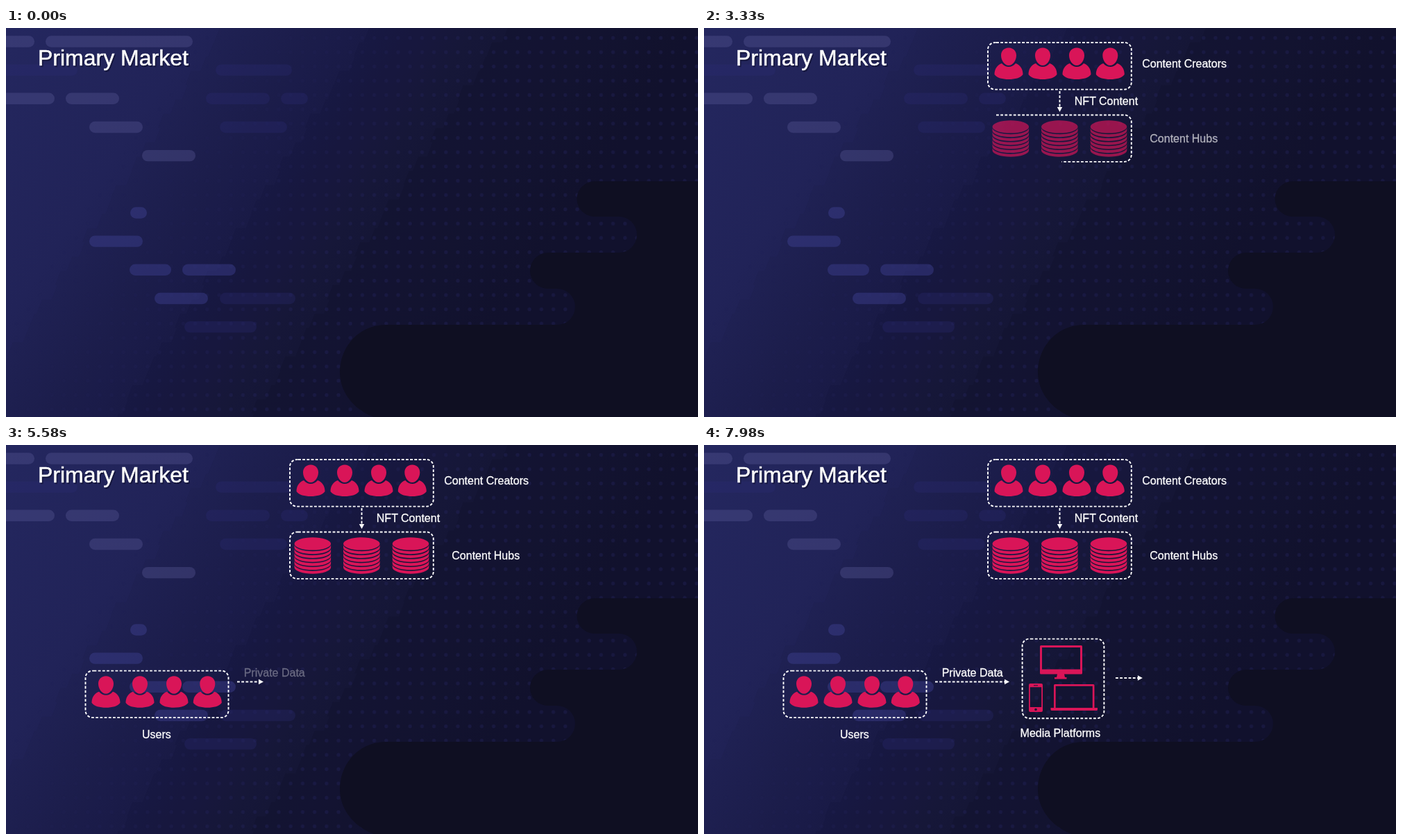
An HTML page for the animation above (8000 ms loop, 997 by 561 pixels).

```html
<!DOCTYPE html>
<html lang="en">
<head>
<meta charset="utf-8">
<title>Primary Market</title>
<style>
  html, body { margin: 0; width: 100%; height: 100%; overflow: hidden; background: #131330; }
  svg { display: block; width: 100%; height: 100%; }
  text { font: 16px "Liberation Sans", Arial, sans-serif; fill: #fff; stroke: #fff; stroke-width: .3; }
  .title { font-size: 32px; stroke-width: .5; }
  .shade { fill: #0b0b25; stroke: #0b0b25; opacity: .55; }
  .dash { fill: none; stroke: #fff; stroke-width: 1.9; stroke-dasharray: 3.8 2.4; }
  .icon { fill: #d91558; fill-rule: evenodd; }
</style>
</head>
<body>
<svg id="stage" viewBox="0 0 997 561" preserveAspectRatio="none">
  <defs>
    <linearGradient id="sky" gradientUnits="userSpaceOnUse" x1="0" y1="0" x2="698" y2="458">
      <stop offset="0" stop-color="#24275f"/>
      <stop offset=".28" stop-color="#212358"/>
      <stop offset=".5" stop-color="#1b1c4a"/>
      <stop offset=".72" stop-color="#161739"/>
      <stop offset="1" stop-color="#131330"/>
    </linearGradient>
    <linearGradient id="fade" gradientUnits="userSpaceOnUse" x1="200" y1="131" x2="480" y2="315">
      <stop offset="0" stop-color="#000"/>
      <stop offset="1" stop-color="#fff"/>
    </linearGradient>
    <pattern id="dots" width="17.2" height="20.6" patternUnits="userSpaceOnUse" x="6" y="4">
      <circle cx="8.6" cy="10.3" r="2.6" fill="#25265f" opacity=".38"/>
    </pattern>
    <mask id="dotMask" maskUnits="userSpaceOnUse" x="0" y="0" width="997" height="561">
      <rect width="997" height="561" fill="url(#fade)"/>
    </mask>
  </defs>
  <rect width="997" height="561" fill="url(#sky)"/>
  <g id="back"></g>
  <rect width="997" height="561" fill="url(#dots)" mask="url(#dotMask)"/>
  <path fill="#0f0f22" d="M997 221H848a25.5 25.5 0 0 0 0 51H883a26 26 0 0 1 0 52H781a26 26 0 0 0 0 52H794a26 26 0 0 1 0 52H548C508 428 481 460 481 497C481 524 500 550 530 561H997Z"/>
  <g id="pills"></g>
  <text class="title shade" x="47.5" y="56">Primary Market</text>
  <text class="title" x="46" y="54.4">Primary Market</text>
  <g id="front"></g>
</svg>
<script>
const LOOP = 8000;
const $ = id => document.getElementById(id);

function add(parent, tag, attrs = {}, text) {
  const el = document.createElementNS("http://www.w3.org/2000/svg", tag);
  for (const k in attrs) el.setAttribute(k, attrs[k]);
  if (text) el.textContent = text;
  return parent.appendChild(el);
}

// Darker diagonal bands with a slightly ragged left edge
function band(x0, opacity) {
  let d = "M997 0";
  for (let y = 0, i = 0; y < 570; y += 20.6, i++) {
    const x = x0 - y * 0.656 + 5 * Math.sin(i * 2.3 + x0);
    d += `L${x.toFixed(1)} ${y.toFixed(1)}l-8 20.6`;
  }
  add($("back"), "path", { d: d + "H997Z", fill: "#101029", opacity });
}
band(312, .06);
band(525, .1);
band(718, .27);

// Pills: row, left, right, kind (0 light, 1 blue, 2 faint)
const kinds = [["#5a5a96", .36], ["#43459a", .4], ["#2b2b78", .28]];
[
  [0, -30, 41, 0], [0, 57, 269, 0], [1, -30, 103, 2], [1, 302, 412, 2],
  [2, -30, 70, 0], [2, 86, 163, 0], [2, 288, 380, 2], [2, 396, 435, 2],
  [3, 120, 197, 0], [3, 308, 405, 2], [4, 196, 273, 0], [6, 179, 203, 1],
  [7, 120, 197, 1], [8, 178, 238, 1], [8, 254, 331, 1], [9, 214, 291, 1],
  [9, 308, 417, 2], [10, 257, 361, 2]
].forEach(([row, a, b, kind]) => add($("pills"), "rect", {
  x: a, y: 11.3 + row * 41.16, width: b - a, height: 16.4, rx: 8.2,
  fill: kinds[kind][0], opacity: kinds[kind][1]
}));

const icon = (g, d, x = 0, y = 0) =>
  add(g, "path", { d, class: "icon", transform: `translate(${x} ${y})` });

const PERSON = "M0-13C7-13 11-8 11-2C11 5 6 12.5 0 12.5S-11 5-11-2C-11-8-7-13 0-13Z" +
  "M-10 9.5C-17 12-20.5 18-20.5 25.5C-17 30.5-9 32.5 0 32.5S17 30.5 20.5 25.5" +
  "C20.5 18 17 12 10 9.5C7 13 4 14.5 0 14.5S-7 13-10 9.5Z";

let HUB = "M-26.3 0a26.3 9.2 0 0 1 52.6 0a26.3 9.2 0 0 1-52.6 0Z";
for (let i = 0; i < 6; i++)
  HUB += `M-26.3 ${1.6 + i * 5.7}a26.3 9.2 0 0 0 52.6 0v4.1a26.3 9.2 0 0 1-52.6 0Z`;

const MONITOR = "M485.5 289H543.5q1.5 0 1.5 1.5V329q0 1.5-1.5 1.5H485.5q-1.5 0-1.5-1.5V290.5q0-1.5 1.5-1.5Z" +
  "M487 292V323.5H542V292ZM509 330.5H519L520 335H522.5V337.5H505V335H508Z";
const PHONE = "M470 344H486q2 0 2 2V383q0 2-2 2H470q-2 0-2-2V346q0-2 2-2ZM469.8 349.3V378H486.2V349.3Z" +
  "M475 346.3V347.3H481V346.3ZM478 379.7a1.8 1.8 0 0 0 0 3.6a1.8 1.8 0 0 0 0-3.6Z";
const LAPTOP = "M505.5 345H561q1.5 0 1.5 1.5V379H567V381.5q0 1.5-1.5 1.5H501q-1.5 0-1.5-1.5V379H504V346.5q0-1.5 1.5-1.5Z" +
  "M506.7 347.7V379H559.8V347.7Z";

const persons = (g, x, y) => [0, 49, 98, 146.3].forEach(dx => icon(g, PERSON, x + dx, y));

const parts = [];

// Dashed frame that draws itself clockwise while its icons and label fade in
function panel(start, dur, [x, y, w, h], label, tx, ty, draw) {
  const r = 10, id = "m" + start;
  const d = `M${x + 12} ${y}H${x + w - r}a${r} ${r} 0 0 1 ${r} ${r}V${y + h - r}a${r} ${r} 0 0 1-${r} ${r}` +
    `H${x + r}a${r} ${r} 0 0 1-${r}-${r}V${y + r}a${r} ${r} 0 0 1 ${r}-${r}Z`;
  const g = add($("front"), "g");
  const mask = add(g, "mask", { id, maskUnits: "userSpaceOnUse", x: 0, y: 0, width: 997, height: 561 });
  const pen = add(mask, "path", { d, pathLength: 1, fill: "none", stroke: "#fff", "stroke-width": 5 });
  add(add(g, "g", { mask: `url(#${id})` }), "path", { d, class: "dash" });
  const body = add(g, "g");
  draw(body);
  add(body, "text", { x: tx, y: ty }, label);
  parts.push({ start, dur, g, set(p) {
    pen.setAttribute("stroke-dasharray", `${Math.max(.004, p)} 2`);
    body.setAttribute("opacity", p);
  } });
}

// Dashed arrow whose head travels with the tip
function arrow(start, dur, x, y, angle, len, label, tx, ty) {
  const g = add($("front"), "g");
  const a = add(g, "g", { transform: `translate(${x} ${y}) rotate(${angle})` });
  const line = add(a, "path", { class: "dash" });
  const head = add(a, "path", { d: "M0 0L-7-3.7V3.7Z", fill: "#fff" });
  const text = label && add(g, "text", { x: tx, y: ty }, label);
  parts.push({ start, dur, g, set(p) {
    const tip = len * p;
    line.setAttribute("d", `M0 0H${Math.max(0, tip - 7)}`);
    head.setAttribute("transform", `translate(${tip}) scale(${Math.min(1, tip / 7)})`);
    if (text) text.setAttribute("opacity", p);
  } });
}

panel(930, 800, [409, 21, 206.8, 67.6], "Content Creators", 631.2, 57, g => persons(g, 439, 41.5));
arrow(1740, 350, 512.5, 91, 90, 30, "NFT Content", 533.8, 111);
panel(3000, 710, [409, 125.5, 206.8, 67.4], "Content Hubs", 642.3, 165,
  g => [441.8, 512.3, 583].forEach(x => icon(g, HUB, x, 142.4)));
panel(4620, 800, [114.5, 325.6, 206, 67.5], "Users", 196, 423, g => persons(g, 144, 346.3));
arrow(5430, 650, 333, 341.5, 0, 107, "Private Data", 342.7, 333.5);
panel(6960, 800, [458.6, 279.6, 117.8, 114.6], "Media Platforms", 455.6, 420.5,
  g => [MONITOR, PHONE, LAPTOP].forEach(d => icon(g, d)));
arrow(7770, 650, 593, 336, 0, 80);

function render(t) {
  for (const { start, dur, g, set } of parts) {
    const on = t >= start;
    g.setAttribute("visibility", on ? "visible" : "hidden");
    if (on) set(Math.sin(Math.min(1, (t - start) / dur) * Math.PI / 2));
  }
}

let t0;
function tick(now) {
  t0 ??= now;
  render((now - t0) % LOOP);
  requestAnimationFrame(tick);
}
render(0);
requestAnimationFrame(tick);
</script>
</body>
</html>
```
